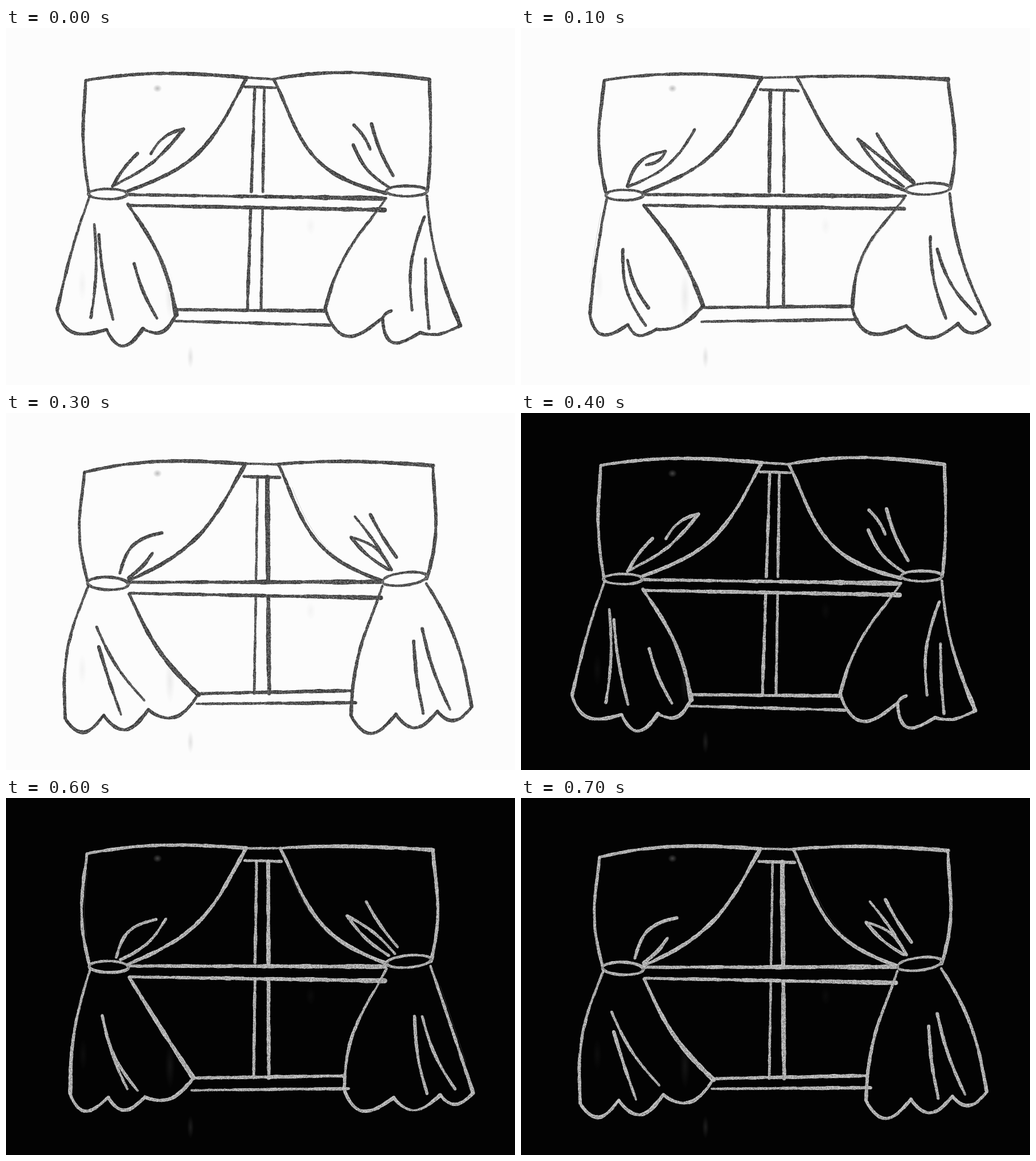
These frames come from a looping animation (894 by 626 pixels, 0.8 s). An HTML page with a canvas:

```html
<!DOCTYPE html>
<html lang="en">
<head>
<meta charset="utf-8">
<title>Curtains</title>
<style>
  html, body { margin: 0; width: 100%; height: 100%; overflow: hidden; background: #fcfcfc; }
  #stage { position: relative; width: 894px; height: 626px; overflow: hidden; }
  #reel { display: block; animation: reel 800ms steps(8) infinite; }
  @keyframes reel { to { transform: translateY(-100%); } }
</style>
</head>
<body>
<div id="stage"><canvas id="reel" width="894" height="5008"></canvas></div>
<script>
const W = 894, H = 626;
const reel = document.getElementById('reel');
const ctx = reel.getContext('2d');

let seed = 7;
const rnd = () => (seed = (seed * 16807) % 2147483647) / 2147483647;
const jit = n => (rnd() - 0.5) * n;
const lerp = (a, b, t) => a + (b - a) * t;

// Halfway between two values of the same structure
function mix(a, b) {
  if (typeof a === 'number') return (a + b) / 2;
  if (Array.isArray(a)) return a.map((v, i) => mix(v, b[i]));
  return Object.fromEntries(Object.keys(a).map(k => [k, mix(a[k], b[k])]));
}

// --- Charcoal ---

function dot(x, y, r) {
  ctx.beginPath();
  ctx.arc(x, y, r, 0, 7);
  ctx.fill();
}

// at(t) gives the point for t from 0 to 1
function charcoal(at, w0, w1 = w0) {
  let len = 0;
  for (let i = 0; i < 20; i++) {
    const [a, b] = at(i / 20), [c, d] = at((i + 1) / 20);
    len += Math.hypot(c - a, d - b);
  }
  const n = Math.ceil(len / 0.9);
  let press = 0, drift = 0;
  for (let i = 0; i <= n; i++) {
    const [x, y] = at(i / n);
    press = press * 0.94 + jit(0.13);
    drift = drift * 0.93 + jit(0.22);
    const r = lerp(w0, w1, i / n) / 2 * (0.97 + press);
    const g = 50 + rnd() * 26 | 0, a = rnd() * 6.28;
    ctx.fillStyle = `rgba(${g},${g},${g},.8)`;
    dot(x + drift + jit(0.4), y + drift + jit(0.4), r);
    ctx.fillStyle = 'rgba(70,70,70,.4)';
    ctx.fillRect(x + Math.cos(a) * (r + 0.4) - 0.5, y + Math.sin(a) * (r + 0.4) - 0.5, 1, 1);
  }
  ctx.fillStyle = 'rgba(250,250,250,.3)';
  for (let i = 0; i <= n; i++) {
    const [x, y] = at(i / n), w = lerp(w0, w1, i / n);
    for (let k = 0; k < w * 0.3; k++) ctx.fillRect(x + jit(w), y + jit(w), 1, 1);
  }
}

// Faint pencil line beside a stroke
function ghost(at) {
  const dx = jit(14), dy = jit(6);
  ctx.strokeStyle = 'rgba(60,60,60,.2)';
  ctx.beginPath();
  for (let t = 0.15; t < 0.8; t += 0.05) {
    const [x, y] = at(t);
    ctx.lineTo(x + dx, y + dy);
  }
  ctx.stroke();
}

function smudge(x, y, rx, ry, alpha) {
  ctx.save();
  ctx.translate(x, y);
  ctx.scale(rx, ry);
  const g = ctx.createRadialGradient(0, 0, 0, 0, 0, 1);
  g.addColorStop(0, `rgba(90,90,90,${alpha})`);
  g.addColorStop(1, 'rgba(90,90,90,0)');
  ctx.fillStyle = g;
  dot(0, 0, 1);
  ctx.restore();
}

// --- Shapes ---

// Line from p to q that bows by sag to the right of its direction, most at t = peak
function bow([x0, y0], [x1, y1], sag = 0, peak = 0.5) {
  const dx = x1 - x0, dy = y1 - y0, len = Math.hypot(dx, dy);
  const k = Math.log(0.5) / Math.log(peak);
  return t => {
    const s = Math.sin(Math.PI * t ** k) * sag / len;
    return [x0 + dx * t - dy * s, y0 + dy * t + dx * s];
  };
}

function ellipse([x, y, rx, ry, tilt]) {
  return t => {
    const u = rx * Math.cos(t * 6.283), v = ry * Math.sin(t * 6.283);
    return [x + u - v * tilt, y + v + u * tilt];
  };
}

function hem({ cusps, depth }, w) {
  depth.forEach((d, i) => charcoal(bow(cusps[i], cusps[i + 1], d, 0.44), w));
}

// Points on a tie: side -1 is its left end, 1 its right end
const end = ([x, y, rx], side, dx, dy) => [x + side * rx + dx, y + dy];

// --- Poses ---
// tie: centre, radii, tilt.  bars: x at lintel and sill, width.  rail, sill: y left and right.
// sag: top, edge, drape, outer and inner skirt, each left then right.
// folds: start, end, sag.

const first = {
  corners: [[140, 92], [744, 90]], open: [[423, 87], [470, 90]], lintel: 104,
  ties: [[179, 291, 34, 9, 0], [704, 286, 36, 9, 0]],
  bars: [[437, 424, 5], [454, 448, 4.5]],
  rail: [[292, 299], [311, 319]], sill: [[494, 496], [514, 521]],
  sag: { top: [-10, -12], edge: [7, -4], drape: [-37, 45], outer: [4, 11], inner: [-14, 14] },
  hems: [
    { cusps: [[90, 495], [177, 529], [241, 527], [299, 503]], depth: [26, 30, 18] },
    { cusps: [[561, 492], [662, 508], [728, 534], [798, 522]], depth: [42, 34, 8] }],
  folds: [
    [155, 344, 149, 508, -6], [163, 362, 188, 511, 4],
    [735, 331, 713, 495, 12], [737, 405, 743, 527, 2],
    [231, 220, 187, 278, 3], [312, 177, 190, 276, -11],
    [610, 205, 672, 279, 9], [611, 170, 640, 213, -3], [642, 168, 680, 259, 4]],
  extra: [[225, 413, 265, 509, 4], [254, 221, 312, 177, -9], [662, 508, 677, 496, -2]]
};

const second = {
  corners: [[146, 92], [750, 90]], open: [[423, 87], [484, 86]], lintel: 109,
  ties: [[182, 293, 33, 9, 0], [715, 282, 39, 10, -0.05]],
  bars: [[438, 434, 6], [462, 461, 5]],
  rail: [[292, 295], [311, 317]], sill: [[490, 488], [515, 511]],
  sag: { top: [-9, -3], edge: [11, -10], drape: [-36, 34], outer: [3, 13], inner: [-11, 23] },
  hems: [
    { cusps: [[121, 500], [188, 520], [238, 528], [320, 488]], depth: [30, 16, 12] },
    { cusps: [[582, 490], [677, 522], [768, 518], [823, 520]], depth: [33, 23, 16] }],
  folds: [
    [179, 388, 219, 522, 14], [187, 407, 224, 491, 6],
    [719, 365, 746, 509, 8], [731, 388, 798, 501, 10],
    [254, 216, 187, 278, 17], [305, 178, 187, 278, -17],
    [592, 195, 672, 278, 7], [592, 195, 690, 272, 0], [625, 185, 690, 270, 4]],
  extra: [[220, 240, 254, 216, 6]]
};

const last = {
  corners: [[138, 104], [750, 92]], open: [[421, 89], [478, 90]], lintel: 112,
  ties: [[179, 299, 36, 11, 0.04], [700, 291, 39, 11, -0.13]],
  bars: [[442, 436, 4], [459, 462, 8]],
  rail: [[297, 296], [316, 324]], sill: [[492, 487], [510, 508]],
  sag: { top: [-12, -6], edge: [12, -11], drape: [-31, 39], outer: [17, -14], inner: [13, 12] },
  hems: [
    { cusps: [[104, 535], [172, 530], [250, 520], [338, 494]], depth: [27, 30, 26] },
    { cusps: [[606, 530], [685, 528], [758, 523], [818, 515]], depth: [33, 26, 20] }],
  folds: [
    [159, 375, 243, 504, 8], [163, 410, 202, 529, 1],
    [716, 400, 733, 527, 3], [731, 378, 780, 520, 5],
    [274, 210, 200, 281, 19], [257, 246, 215, 289, -3],
    [606, 218, 673, 275, 5], [606, 218, 677, 275, -12], [640, 178, 686, 253, 2]],
  extra: [[613, 182, 675, 272, -3]]
};

const third = { ...mix({ ...second, extra: [] }, { ...last, extra: [] }) };

function draw(p) {
  const { corners: [tl, tr], open: [ol, or], ties: [lt, rt], hems: [lh, rh], sag } = p;
  const hang = (a, b, s, peak, w0, w1) => {
    const at = bow(a, b, s, peak);
    if (rnd() < 0.4) ghost(at);
    charcoal(at, w0, w1);
  };

  // Upper curtains
  hang(tl, ol, sag.top[0], 0.45, 5, 6);
  hang(or, tr, sag.top[1], 0.45, 5, 7);
  hang(tl, end(lt, -1, 0, -5), sag.edge[0], 0.55, 5, 5);
  hang(tr, end(rt, 1, 0, 0), sag.edge[1], 0.58, 5.5, 5.5);
  hang(ol, end(lt, 1, 0, -5), sag.drape[0], 0.53, 6, 5.5);
  hang(or, end(rt, -1, 0, 4), sag.drape[1], 0.55, 5, 6);

  // Window frame
  charcoal(bow(ol, or), 4);
  charcoal(bow([ol[0] - 3, p.lintel - 1], [or[0] + 3, p.lintel + 1]), 5);
  const left = end(lt, 1, 2, 0)[0], right = end(rt, -1, -3, 0)[0];
  p.rail.forEach(([a, b]) => charcoal(bow([left, a], [right, b]), 5, 7.5));
  p.sill.forEach(([a, b], i) =>
    charcoal(bow([lh.cusps[3][0] - 3 * i, a], [rh.cusps[0][0] + 8 * i, b]), 5 - i, 6));
  const foot = p.sill[0][0];
  p.bars.forEach(([x0, x1, w]) => {
    const bar = bow([x0, p.lintel], [x1, foot]);
    const cut = y => bar((y - p.lintel) / (foot - p.lintel));
    charcoal(bow([x0, p.lintel], cut(p.rail[0][0] - 5)), w);
    charcoal(bow(cut(p.rail[1][0] + 7), [x1, foot]), w * 0.7 + 1.5);
  });

  // Ties and lower curtains
  [lt, rt].forEach(t => charcoal(ellipse(t), 4.5));
  hang(end(lt, -1, 2, 4), lh.cusps[0], sag.outer[0], 0.5, 4, 6);
  hang(end(lt, 1, 1, 18), lh.cusps[3], sag.inner[0], 0.52, 5.5, 8);
  hang(end(rt, -1, 0, 12), rh.cusps[0], sag.inner[1], 0.57, 4, 6);
  hang(end(rt, 1, -1, 8), rh.cusps[3], sag.outer[1], 0.48, 4.5, 6);
  hem(lh, 5.5);
  hem(rh, 5.5);

  [...p.folds, ...p.extra].forEach(([a, b, c, d, s]) =>
    charcoal(bow([a, b], [c, d], s), 4.5 + rnd() * 1.5, 5));

  // Dust on the paper
  smudge(266, 106, 8, 7, 0.4);
  smudge(324, 577, 6, 20, 0.16);
  smudge(535, 347, 9, 16, 0.05);
  smudge(288, 470, 9, 40, 0.1);
  smudge(lt[0] - 45, 450, 8, 28, 0.06);
}

ctx.fillStyle = '#fcfcfc';
ctx.fillRect(0, 0, W, H * 4);
[first, second, third, last].forEach(pose => {
  draw(pose);
  ctx.translate(0, H);
});

// Negative copies fill the second half of the loop
ctx.drawImage(reel, 0, 0, W, H * 4, 0, 0, W, H * 4);
ctx.globalCompositeOperation = 'difference';
ctx.fillStyle = '#fff';
ctx.fillRect(0, 0, W, H * 4);
</script>
</body>
</html>
```
